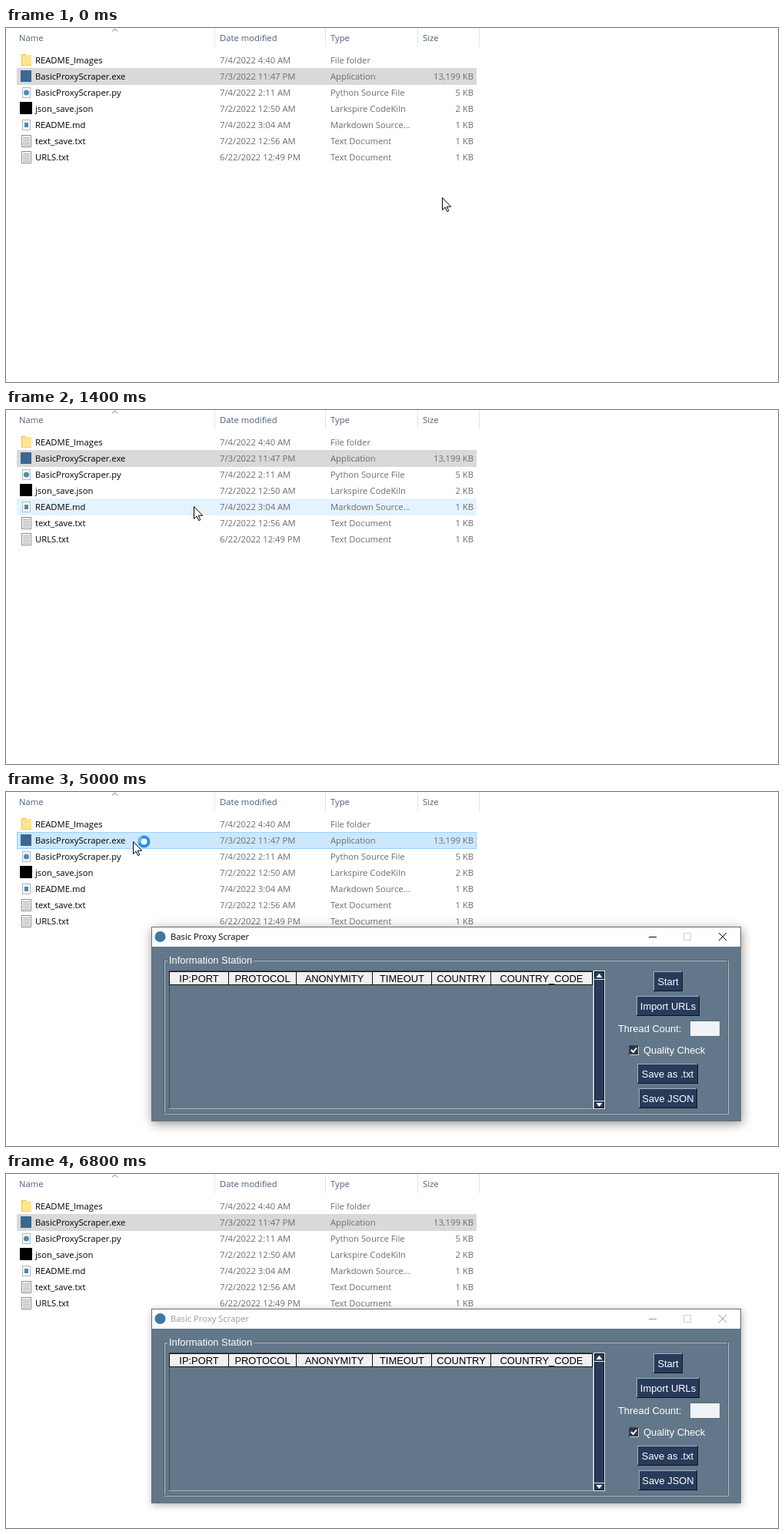
These frames come from a looping animation (1004x460 px, 7.27 s). An HTML page:

```html
<!DOCTYPE html>
<html lang="en">
<head>
<meta charset="utf-8">
<title>File list and scraper window</title>
<style>
  html, body { margin: 0; height: 100%; overflow: hidden; background: #fff; }
  svg { display: block; }
  text { font: 11.25px "Open Sans", "Noto Sans", sans-serif; white-space: pre; }
  .tk { font: 12.9px "Liberation Sans", Arial, sans-serif; }
  .mid { text-anchor: middle; }
  .end { text-anchor: end; }
  #app { filter: drop-shadow(1px 3px 7px rgba(0, 0, 0, .42)); }
  #app.idle { filter: drop-shadow(1px 2px 5px rgba(0, 0, 0, .3)); }
</style>
</head>
<body>
<svg id="stage" width="1004" height="460" viewBox="0 0 1004 460"></svg>
<script>
const LOOP = 7270, ROW_TOP = 31, ROW_STEP = 21, ROW_H = 22, SELECTED = 1;
const WINDOW_AT = 5000, BUSY_AT = 2270, GONE_AT = 6470, IDLE_AT = 6800;

// time, x, y of the pointer tip; each position holds until the next
const path = [
  [0, 568, 220], [930, 559, 220], [1000, 535, 215], [1070, 490, 200],
  [1130, 435, 181], [1200, 375, 162], [1270, 325, 147], [1330, 282, 135],
  [1400, 245, 125], [1470, 220, 118], [1530, 205, 113], [1600, 194, 109],
  [1670, 186, 98], [1730, 178, 84], [1800, 171, 73], [1870, 167, 67],
  [1930, 166, 64], [6200, 146, 107], [6270, 130, 143], [6330, 112, 250],
  [6400, 96, 397]
];

const files = [
  ['README_Images', '7/4/2022 4:40 AM', 'File folder', ''],
  ['BasicProxyScraper.exe', '7/3/2022 11:47 PM', 'Application', '13,199 KB'],
  ['BasicProxyScraper.py', '7/4/2022 2:11 AM', 'Python Source File', '5 KB'],
  ['json_save.json', '7/2/2022 12:50 AM', 'Larkspire CodeKiln', '2 KB'],
  ['README.md', '7/4/2022 3:04 AM', 'Markdown Source...', '1 KB'],
  ['text_save.txt', '7/2/2022 12:56 AM', 'Text Document', '1 KB'],
  ['URLS.txt', '6/22/2022 12:49 PM', 'Text Document', '1 KB']
];

const rect = (x, y, w, h, fill) =>
  `<rect x="${x}" y="${y}" width="${w}" height="${h}" fill="${fill}"/>`;
const frame = (x, y, w, h, color, fill = 'none') =>
  `<rect x="${x + .5}" y="${y + .5}" width="${w - 1}" height="${h - 1}" fill="${fill}" stroke="${color}"/>`;
const line = (d, color, width = 1) =>
  `<path d="${d}" fill="none" stroke="${color}" stroke-width="${width}"/>`;
const shape = (d, fill) => `<path d="${d}" fill="${fill}"/>`;
const dot = (x, y, r, fill) => `<circle cx="${x}" cy="${y}" r="${r}" fill="${fill}"/>`;
const text = (x, y, s, fill, cls = '') =>
  `<text x="${x}" y="${y}" fill="${fill}" class="${cls}">${s}</text>`;

const page = y => frame(21, y + 4, 11, 14, '#b5b5b5', '#fbfbfb');
const folder = y => rect(20, y + 3, 6, 3, '#eac24f') + rect(20, y + 4, 13, 14, '#ffe58c') +
  rect(20, y + 4, 1, 14, '#eac24f') + rect(20, y + 17, 13, 1, '#f2cf62');
const note = y => frame(20, y + 3, 13, 16, '#8c8c8c', '#fff') +
  [6, 8, 10, 12, 14, 16].map(d => rect(22, y + d, 9, 1, '#a8a8a8')).join('');
const icons = [
  folder,
  y => rect(19, y + 3, 14, 15, '#3a6890'),
  y => page(y) + dot(26.5, y + 11, 3.5, '#4590b8'),
  y => rect(18, y + 2, 16, 16, '#000'),
  y => page(y) + rect(24, y + 8, 5, 6, '#3f8db5'),
  note, note
];

function explorer() {
  const heads = [[17, 'Name'], [278, 'Date modified'], [422, 'Type'], [542, 'Size']];
  let s = heads.map(([x, h]) => text(x, 17, h, '#4c607a')).join('');
  s += [271, 415, 535, 615].map(x => rect(x, 0, 1, 25, '#e5e5e5')).join('');
  s += line('M138 4.5 141.5 1 145 4.5', '#6d6d6d');
  files.forEach(([name, date, type, size], i) => {
    const y = ROW_TOP + i * ROW_STEP, base = y + 15;
    s += icons[i](y) + text(38, base, name, '#000') + text(278, base, date, '#6d6d6d') +
      text(422, base, type, '#6d6d6d') + text(608, base, size, '#6d6d6d', 'end');
  });
  return s;
}

const button = (x, y, w, label) =>
  rect(x, y, w, 26, '#0c121c') + rect(x, y, w - 1, 25, '#a3afbf') +
  rect(x + 1, y + 1, w - 2, 24, '#283b5b') + text(x + w / 2, y + 18, label, '#fff', 'tk mid');

function table() {
  const edges = [212, 289, 377, 476, 553, 630, 762];
  const heads = ['IP:PORT', 'PROTOCOL', 'ANONYMITY', 'TIMEOUT', 'COUNTRY', 'COUNTRY_CODE'];
  let s = line('M212.5 411.5V232.5H763', '#3a4654') + line('M212 411.5H763.5V233', '#a5b0bc');
  heads.forEach((h, i) => {
    const x = edges[i], w = edges[i + 1] - x;
    s += frame(x, 233, w + 1, 18, '#111', '#f0f0f0') + text(x + w / 2 + .5, 247, h, '#000', 'tk mid');
  });
  return s + frame(764, 232, 15, 180, '#e4e8ec') + frame(765, 233, 13, 178, '#0c121c', '#283b5b') +
    line('M765 243.5H778M765 401.5H778', '#e4e8ec') +
    shape('M771.5 236 775.5 241H767.5z', '#fff') + shape('M767.5 404H775.5L771.5 409z', '#fff');
}

function app() {
  return rect(189, 175, 767, 253, '#6b6f74') + rect(190, 176, 765, 25, '#fff') +
    rect(190, 201, 765, 226, '#627789') + dot(200.5, 188, 7, '#3d78a8') +
    `<g id="title">${text(214, 192, 'Basic Proxy Scraper', 'currentColor')}` +
    line('M836 188.5H846M927 183 937 193M937 183 927 193', 'currentColor') + '</g>' +
    frame(881, 183, 10, 10, '#cfcfcf') +
    frame(206, 219, 734, 200, '#b1bbc6') + frame(205, 218, 734, 200, '#505f70') +
    line('M206.5 417V219.5H938', '#b1bbc6') +
    rect(210, 212, 112, 14, '#627789') + text(212, 223, 'Information Station', '#fff', 'tk') +
    table() +
    button(842, 233, 38, 'Start') + button(820, 265, 82, 'Import URLs') +
    text(796, 312, 'Thread Count:', '#fff', 'tk') +
    rect(889, 297, 39, 20, '#f0f3f7') + line('M889.5 317V297.5H928', '#5a6a7c') +
    frame(810, 329, 13, 13, '#c3cbd4', '#2c3643') + line('M810.5 342V329.5H823', '#3a4654') +
    line('M813 335 815.7 338 820 332.5', '#fff', 2) +
    text(829, 340, 'Quality Check', '#fff', 'tk') +
    button(821, 353, 79, 'Save as .txt') + button(823, 385, 76, 'Save JSON');
}

const pointer =
  '<path d="M-.5 .5V16.5L3.1 13 5.7 18.6 7.8 17.7 5.3 12.2H10.6z" fill="#fff" stroke="#000"/>' +
  '<g id="busy"><circle cx="13.5" cy=".5" r="6" fill="#fff" stroke="#2c8ee6" stroke-width="4"/>' +
  line('M7.8 2A6 6 0 0 1 11 -5', '#5cc3f3', 3) + '</g>';

const $ = id => document.getElementById(id);
$('stage').innerHTML =
  `<g id="rows"></g>${explorer()}<g id="app">${app()}</g><g id="pointer">${pointer}</g>`;

function rowBands(hover) {
  const top = i => ROW_TOP + i * ROW_STEP;
  const band = (i, fill) => rect(14, top(i), 598, ROW_H, fill);
  if (hover === SELECTED) return frame(14, top(SELECTED), 598, ROW_H, '#99d1ff', '#cce8ff');
  return (files[hover] ? band(hover, '#e5f3ff') : '') + band(SELECTED, '#d9d9d9');
}

const show = (id, on) => $(id).setAttribute('display', on ? 'inline' : 'none');
let lastHover;

function draw(t) {
  const k = path.findLastIndex(p => p[0] <= t);
  const [since, x, y] = path[k];
  // the highlight trails the pointer by half a step, then settles
  const trailing = t - since < 70 && k > 0 ? (path[k - 1][2] + y) / 2 : y;
  const hover = t < GONE_AT ? Math.floor((trailing - ROW_TOP) / ROW_STEP) : -1;
  if (hover !== lastHover) $('rows').innerHTML = rowBands(lastHover = hover);

  show('pointer', t < GONE_AT);
  show('busy', t >= BUSY_AT);
  show('app', t >= WINDOW_AT);
  $('pointer').setAttribute('transform', `translate(${x} ${y})`);
  $('app').classList.toggle('idle', t >= IDLE_AT);
  $('title').style.color = t >= IDLE_AT ? '#999' : '#000';
}

const start = performance.now();
function tick() {
  draw((performance.now() - start) % LOOP);
  requestAnimationFrame(tick);
}
tick();
</script>
</body>
</html>
```
